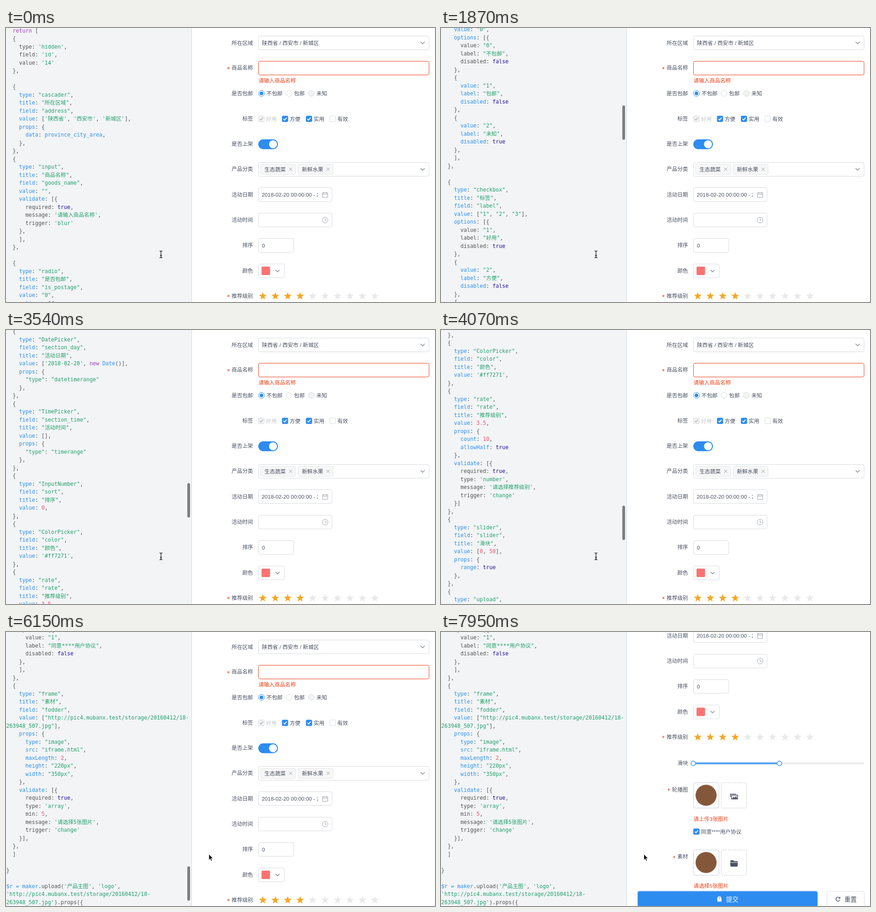
These frames come from a looping animation (937x598 px, 8000 ms). An HTML page:

```html
<!DOCTYPE html>
<html lang="zh">
<head>
<meta charset="utf-8">
<title>Form builder</title>
<style>
html, body { margin: 0; width: 100%; height: 100%; overflow: hidden; background: #fff; }
#stage { position: relative; width: 937px; height: 598px; overflow: hidden; }
#stage > div { position: absolute; top: 0; height: 598px; overflow: hidden; }
#code { left: 0; width: 405px; background: #f2f4f6; border-right: 1px solid #d3d9dc; }
#code pre {
  position: absolute; left: .5px; top: -2.25px; margin: 0; color: #525252;
  font: 11.63px/17.5px "DejaVu Sans Mono", "Noto Sans CJK SC", "Noto Sans CJK", monospace;
}
.str { color: #22a06b; } .word { color: #a03cc0; } .atom { color: #221199; }
.num { color: #f0506e; } .key { color: #2a8fee; }
#thumb { position: absolute; left: 395.6px; top: 0; width: 6.6px; height: 75px; border-radius: 4px; background: #7c7e80; }
#form { left: 406px; width: 531px; }
#form svg { position: absolute; left: 0; top: 0; }
#form text { font-family: "Liberation Sans", "Noto Sans CJK SC", "Noto Sans CJK", sans-serif; }
.cursor { position: absolute; left: 0; top: 0; overflow: visible; }
</style>
</head>
<body>
<div id="stage">
  <div id="code"><pre></pre><i id="thumb"></i></div>
  <div id="form"><svg width="531" height="960" viewBox="406 0 531 960"></svg></div>
  <svg class="cursor" id="beam" width="10" height="16">
    <path d="M-3-7.5Q0-7.5 0-5.5V5.5Q0 7.5-3 7.5M3-7.5Q0-7.5 0-5.5V5.5Q0 7.5 3 7.5M-2 2.5H2" fill="none" stroke="#111" stroke-width="1.3"/>
  </svg>
  <svg class="cursor" id="arrow" width="12" height="18">
    <path d="M0 0V13.2L3 10.4 5.1 15.2 7.3 14.2 5.3 9.5H9.5Z" fill="#111" stroke="#fff" stroke-width=".9"/>
  </svg>
</div>
<script>
const LOOP = 8000;
const $ = sel => document.querySelector(sel);

const script = `  return [
  {
    type: 'hidden',
    field: 'id',
    value: '14'
  },

  {
    type: "cascader",
    title: "所在区域",
    field: "address",
    value: ['陕西省', '西安市', '新城区'],
    props: {
      data: province_city_area,
    },
  },
  {
    type: "input",
    title: "商品名称",
    field: "goods_name",
    value: "",
    validate: [{
      required: true,
      message: '请输入商品名称',
      trigger: 'blur'
    },
    ],
  },

  {
    type: "radio",
    title: "是否包邮",
    field: "is_postage",
    value: "0",
    options: [{
      value: "0",
      label: "不包邮",
      disabled: false
    },
    {
      value: "1",
      label: "包邮",
      disabled: false
    },
    {
      value: "2",
      label: "未知",
      disabled: true
    },
    ],
  },

  {
    type: "checkbox",
    title: "标签",
    field: "label",
    value: ["1", "2", "3"],
    options: [{
      value: "1",
      label: "好用",
      disabled: true
    },
    {
      value: "2",
      label: "方便",
      disabled: false
    },
    {
      value: "3",
      label: "实用",
      disabled: false
    },
    {
      value: "4",
      label: "有效",
      disabled: false
    },
    ]
  },
  {
    type: "switch",
    title: "是否上架",
    field: "is_show",
    value: "1",
    props: {
      "trueValue": "1",
      "falseValue": "0",
    }
  },
  {
    type: "select",
    field: "cate_id",
    title: "产品分类",
    value: ["104", "105"],
    props: {
      multiple: true
    },
    options: [{
      value: "104",
      label: "生态蔬菜",
      disabled: false
    },
    {
      value: "105",
      label: "新鲜水果",
      disabled: false
    },
    ],
  },
  {
    type: "DatePicker",
    field: "section_day",
    title: "活动日期",
    value: ['2018-02-20', new Date()],
    props: {
      "type": "datetimerange"
    },
  },
  {
    type: "TimePicker",
    field: "section_time",
    title: "活动时间",
    value: [],
    props: {
      "type": "timerange"
    },
  },
  {
    type: "InputNumber",
    field: "sort",
    title: "排序",
    value: 0,
  },
  {
    type: "ColorPicker",
    field: "color",
    title: "颜色",
    value: '#ff7271',
  },
  {
    type: "rate",
    field: "rate",
    title: "推荐级别",
    value: 3.5,
    props: {
      count: 10,
      allowHalf: true
    },
    validate: [{
      required: true,
      type: 'number',
      message: '请选择推荐级别',
      trigger: 'change'
    }]
  },
  {
    type: "slider",
    field: "slider",
    title: "滑块",
    value: [0, 50],
    props: {
      range: true
    },
  },
  {
    type: "upload",
    field: "pic",
    title: "轮播图",
    value: ["http://pic4.mubanx.test/storage/20160412/18-
263948_507.jpg"],
    props: {
      type: "select",
      uploadType: "image",
      action: "",
      maxLength: 3,
      multiple: true
    },
    validate: [{
      required: true,
      type: 'array',
      min: 3,
      message: '请上传3张图片',
      trigger: 'change'
    }]
  },
  {
    type: "checkbox",
    title: "",
    field: "checked",
    value: "0",
    options: [{
      value: "1",
      label: "同意****用户协议",
      disabled: false
    },
    ],
  },
  {
    type: "frame",
    title: "素材",
    field: "fodder",
    value: ["http://pic4.mubanx.test/storage/20160412/18-
263948_507.jpg"],
    props: {
      type: "image",
      src: "iframe.html",
      maxLength: 2,
      height: "220px",
      width: "350px",
    },
    validate: [{
      required: true,
      type: 'array',
      min: 5,
      message: '请选择5张图片',
      trigger: 'change'
    }],
  },
  ]

}

$r = maker.upload('产品主图', 'logo',
'http://pic4.mubanx.test/storage/20160412/18-
263948_507.jpg').props({`;

// Keys of the first object in a list stay uncoloured.
function highlight(src) {
  const token = /('[^']*'|"[^"]*")|(\[\{?(?=\n))|(\n *\})|\b(return|new)\b|\b(true|false)\b|\b(\d[\d.]*)|(\w+)(?=:)|(province_city_area|Date\b|\$r = maker)/g;
  let plain = false;
  return src.replace(token, (all, str, open, close, word, atom, num, key) => {
    if (open) plain = true;
    if (close) plain = false;
    if (open || close || (key && plain)) return all;
    const name = str ? 'str' : word ? 'word' : atom ? 'atom' : num ? 'num' : 'key';
    return `<span class="${name}">${all}</span>`;
  });
}
$('#code pre').innerHTML = highlight(script);

const BLUE = '#2d8cf0', RED = '#ed3f14', INK = '#495060', LINE = '#d7dade', SOFT = '#f3f3f3', ICON = '#9da1aa';
const WIDE = 373.5;
const rect = (x, y, w, h, fill, r = 0) => `<rect x="${x}" y="${y}" width="${w}" height="${h}" rx="${r}" fill="${fill}"/>`;
const box = (x, y, w, h, stroke = LINE, fill = '#fff', r = 3.5, extra = '') =>
  `<rect x="${x + .5}" y="${y + .5}" width="${w - 1}" height="${h - 1}" rx="${r}" fill="${fill}" stroke="${stroke}" ${extra}/>`;
const dot = (x, y, r, fill, stroke = 'none', w = 1) =>
  `<circle cx="${x}" cy="${y}" r="${r}" fill="${fill}" stroke="${stroke}" stroke-width="${w}"/>`;
const text = (x, y, s, fill = INK, size = 11.67, extra = '') =>
  `<text x="${x}" y="${y + size * .37}" font-size="${size}" fill="${fill}" ${extra}>${s}</text>`;
const line = (x, y, d, stroke = '#80848f', w = 1.1) =>
  `<path transform="translate(${x} ${y})" d="${d}" fill="none" stroke="${stroke}" stroke-width="${w}"/>`;
const chevron = (x, y) => line(x, y, 'M-4.5-2.2 0 2.3 4.5-2.2', '#70757f', 1.2);

function label(y, s, must) {
  const star = must ? text(539.5 - s.length * 11.67 - 10, y + 2.4, '*', RED, 15) : '';
  return star + text(539.5, y, s, INK, 11.67, 'text-anchor="end"');
}
function radio(x, s, on, off) {
  return dot(x, 142.7, 6.5, off ? SOFT : '#fff', on ? BLUE : LINE) +
    (on ? dot(x, 142.7, 3.9, BLUE) : '') + text(x + 11, 142.7, s);
}
function check(x, y, s, on, off) {
  const fill = off ? SOFT : on ? BLUE : '#fff';
  return box(x, y - 6.8, 13.6, 13.6, on && !off ? BLUE : LINE, fill, 2) +
    (on ? line(x + 6.8, y, 'M-3.3 0-.9 2.6 3.5-2.8', off ? '#bbb' : '#fff', 1.8) : '') +
    text(x + 17, y, s, off ? '#c3c6cb' : INK);
}
function tag(x, s) {
  return box(x, 297, 77.5, 23, '#e3e5e8', '#f7f7f7', 3) + text(x + 8.7, 308.3, s) +
    line(x + 66, 308.3, 'M-3.5-3.5 3.5 3.5M3.5-3.5-3.5 3.5', '#8f949d', 1);
}
function star(x, y, fill) {
  const pts = Array.from({ length: 10 }, (_, i) => {
    const r = i % 2 ? 3.7 : 8.9, a = i * Math.PI / 5;
    return `${(x + r * Math.sin(a)).toFixed(1)},${(y - r * Math.cos(a)).toFixed(1)}`;
  });
  return `<polygon points="${pts.join(' ')}" fill="${fill}"/>`;
}
function upload(y, icon) {
  return box(551, y, 56.5, 56.5, '#c3cedb', '#fff', 4) + dot(579, y + 28, 23, '#85573a') +
    box(611.5, y, 56.5, 56.5, '#c0c4cc', '#fff', 4, 'stroke-dasharray="3 2"') +
    `<g transform="translate(640 ${y + 30})">${icon}</g>`;
}

const photos = line(0, 0, 'M-8 2V-4.5H4.5', INK, 1.5) + line(0, 0, 'M-5.2-2.2H7.8V6.3H-5.2Z', INK, 1.5) +
  `<path d="M-4 5.5-1 1 1.5 3.5 4.5-.5 7 5.5Z" fill="${INK}"/>`;
const folder = `<path d="M-8-5.5Q-8-7-6.5-7H-1.5L0-5H6.5Q8-5 8-3.5V-2.5H-8ZM-8.5-1.5H8.5L7.7 5.5Q7.5 7 6.5 7H-6.5Q-7.5 7-7.7 5.5Z" fill="${INK}"/>`;
const bag = line(608, 938.7, 'M-2.2-4V-5.5H2.2V-4', '#fff', 1.2) + rect(603.5, 934.7, 9, 9.5, '#fff', 1) + rect(606.5, 936.5, 3, 1.2, BLUE);

$('#form svg').innerHTML = [
  label(32.5, '所在区域'), box(551, 17, WIDE, 31), text(559, 33, '陕西省 / 西安市 / 新城区'), chevron(910, 32.3),
  label(87, '商品名称', true), box(551, 72, WIDE, 31, RED), text(551.5, 115, '请输入商品名称', RED),
  label(142.5, '是否包邮'), radio(558, '不包邮', true), radio(618, '包邮'), radio(667, '未知', false, true),
  label(198, '标签'), check(551, 198.3, '好用', true, true), check(602.7, 198.3, '方便', true),
  check(655, 198.3, '实用', true), check(706.7, 198.3, '有效'),
  label(253, '是否上架'), rect(551, 243, 43, 21.5, BLUE, 10.75), dot(583.2, 253.7, 8.75, '#fff'),
  label(308, '产品分类'), box(551, 293, WIDE, 31), tag(555.7, '生态蔬菜'), tag(637.5, '新鲜水果'), chevron(910, 308.3),
  label(363.2, '活动日期'), box(551, 348, 161.5, 31),
  '<clipPath id="cut"><path d="M552 350H681V378H552Z"/></clipPath>',
  text(558.5, 364, '2018-02-20 00:00:00 - 2018', INK, 11.8, 'clip-path="url(#cut)"'),
  line(697, 364, 'M-5.7-4.3H5.7V5.5H-5.7ZM-5.7-1.2H5.7M-3-6V-3M3-6V-3', ICON, 1),
  label(418.7, '活动时间'), box(551, 403.7, 161.5, 31), dot(697, 419.2, 6.2, 'none', ICON),
  line(697, 419.2, 'M0-4V.5H3.5', ICON, 1),
  label(474, '排序'), box(551, 459, 78, 31), text(559, 475, '0'),
  label(529.3, '颜色'), box(551, 514.5, 57.5, 31), box(558.3, 520.8, 18.3, 18.3, '#e56a68', '#ff7271', 1), chevron(593, 530),
  label(584.5, '推荐级别', true),
  ...Array.from({ length: 10 }, (_, i) => star(560.9 + 27.2 * i, 585.3, i < 4 ? '#f5a623' : '#e9e9e9')),
  label(641.5, '滑块'), rect(551, 640.4, WIDE, 3.9, '#e9eaec', 2), rect(551, 640.4, 188, 3.9, '#4a9df3'),
  dot(551, 642.4, 4.9, '#fff', '#57a3f3', 1.9), dot(739, 642.4, 4.9, '#fff', '#57a3f3', 1.9),
  label(699.5, '轮播图', true), upload(684, photos), text(551.5, 763.5, '请上传3张图片', RED),
  check(551, 791.3, '同意****用户协议', true),
  label(846, '素材', true), upload(830.7, folder), text(551.5, 910, '请选择5张图片', RED),
  box(429, 920.7, 394, 35.5, '#8cc0f7', BLUE, 4), bag, text(622.5, 938.7, '提交', '#fff', 13.6),
  box(842.5, 921.5, 82.5, 35), line(867, 938.7, 'M3.4-2.8A4.4 4.4 0 1 0 4.3 1.2M4.4-5V-1.8H1.2', INK, 1.4),
  text(881, 938.7, '重置', INK, 13.6)
].join('');

// Steps are [time, value]; every value holds until the next time.
function play(el, steps, style) {
  const frames = steps.map(([t, v]) => ({ offset: Math.max(0, t - 1) / LOOP, easing: 'step-end', ...style(v) }));
  frames.push({ offset: 1, ...style(steps[steps.length - 1][1]) });
  el.animate(frames, { duration: LOOP, iterations: Infinity });
}
const move = (x, y) => ({ transform: `translate(${x}px, ${y}px)` });
const fade = v => ({ opacity: v });

const codeScroll = [
  [0, 0], [780, 22], [960, 70], [1070, 126], [1190, 189], [1310, 270], [1430, 322],
  [1720, 420], [1870, 580], [2010, 710], [2130, 780],
  [2550, 1026], [2700, 1240], [2820, 1350],
  [3420, 1640], [3540, 1910], [3660, 2080], [3810, 2200], [3950, 2270], [4070, 2305],
  [4550, 2520], [4700, 2840], [4870, 3110.5], [4990, 3210], [5110, 3256],
  [5500, 3290], [5610, 3320], [5720, 3336]
];
const formScroll = [
  [0, 0], [6690, 6], [6900, 20], [7200, 62], [7320, 130], [7440, 200],
  [7560, 262], [7680, 308], [7830, 340], [7950, 355.7]
];

play($('#code pre'), codeScroll, s => move(0, -s));
play($('#thumb'), codeScroll, s => move(0, 97 + s / 8.05));
play($('#thumb'), [[0, 0], [780, 1], [6690, .5], [6900, 0]], fade);
play($('#form svg'), formScroll, s => move(0, -s));
play($('#beam'), [[0, [338.5, 494]], [5830, [352, 493]], [5940, [386, 492]]], p => move(...p));
play($('#beam'), [[0, 1], [6040, 0]], fade);
play($('#arrow'), [[0, [428, 484.7]], [6150, [443, 484.7]]], p => move(...p));
play($('#arrow'), [[0, 0], [6040, 1]], fade);
</script>
</body>
</html>
```
